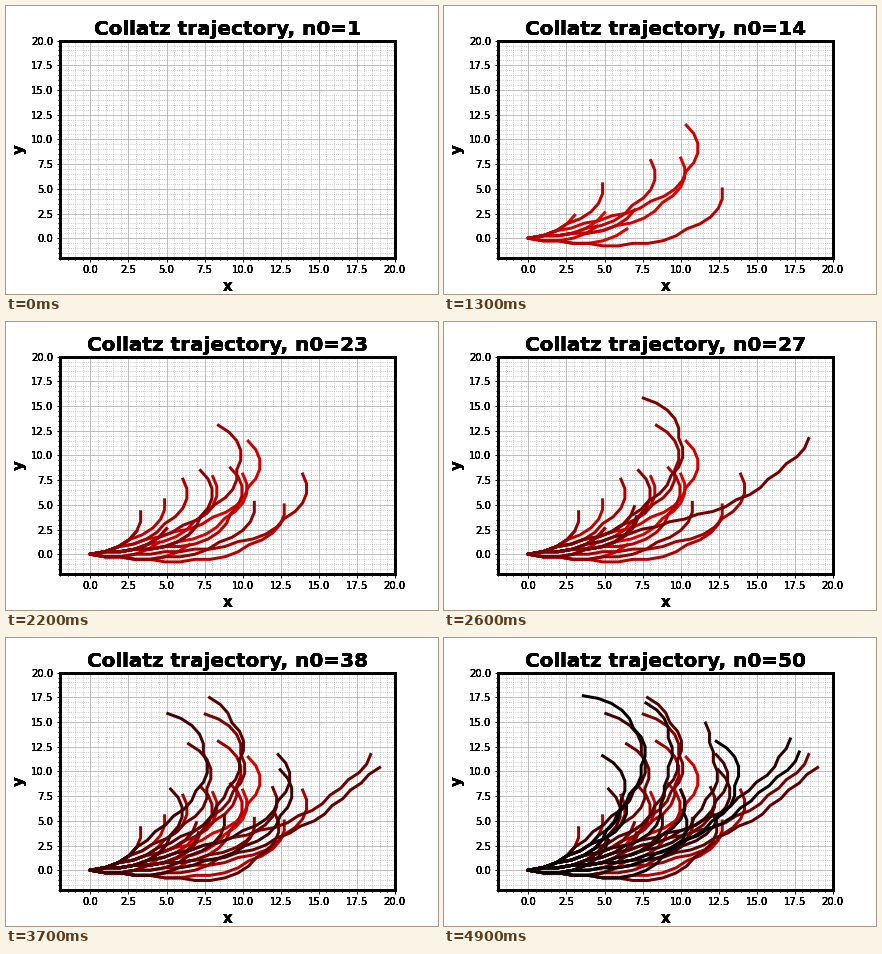
A matplotlib script that plays this animation: 432x288 px, repeating every 5000 ms.

```python
import numpy as np
import matplotlib.pyplot as plt
from matplotlib.animation import FuncAnimation

COUNT = 50
MAX_TERMS = 25
TURN = np.radians(15)

plt.rcParams["font.family"] = "DejaVu Sans"


def collatz(n):
    terms = [n]
    while n != 1 and len(terms) < MAX_TERMS:
        n = 3 * n + 1 if n % 2 else n // 2
        terms.append(n)
    return terms


def trajectory(n):
    """Unit steps that turn left on even terms and right on odd ones."""
    turns = [-TURN if term % 2 else TURN for term in collatz(n)[1:-1]]
    heading = np.cumsum(turns)
    x = np.concatenate([[0], np.cumsum(np.cos(heading))])
    y = np.concatenate([[0], np.cumsum(np.sin(heading))])
    return x, y


def harden(artist, passes=5):
    """Paint an artist repeatedly so that its soft edges turn solid."""
    draw = artist.draw

    def draw_repeatedly(renderer):
        for _ in range(passes):
            draw(renderer)

    artist.draw = draw_repeatedly


fig, ax = plt.subplots(figsize=(6, 4), dpi=72, facecolor="white")
fig.subplots_adjust(left=0.125, right=0.9, bottom=0.125, top=0.88)
ax.set(xlim=(-2, 20), ylim=(-2, 20))
ax.set_xticks(np.arange(0, 20.1, 2.5))
ax.set_yticks(np.arange(0, 20.1, 2.5))
ax.minorticks_on()
ax.tick_params(which="both", width=1)
ax.tick_params(labelsize=10)
ax.grid(which="major", color="#b0b0b0", linestyle="-", linewidth=0.8)
ax.grid(which="minor", color="#b0b0b0", linestyle=":", linewidth=0.8)
for spine in ax.spines.values():
    spine.set_linewidth(3)

title = ax.set_title("", fontsize=20, fontweight="bold")
x_label = ax.set_xlabel("x", fontsize=15, fontweight="bold")
y_label = ax.set_ylabel("y", fontsize=15, fontweight="bold")
for text in [title, x_label, y_label, *ax.get_xticklabels(), *ax.get_yticklabels()]:
    harden(text)

curves = []
for n in range(1, COUNT + 1):
    x, y = trajectory(n)
    if len(x) < 2:
        x, y = [], []
    curves += ax.plot(x, y, color=(1 - n / COUNT, 0, 0), linewidth=3)


def update(frame):
    for i, curve in enumerate(curves):
        curve.set_visible(i <= frame)
    title.set_text(f"Collatz trajectory, n0={frame + 1}")
    return curves


animation = FuncAnimation(fig, update, frames=COUNT, interval=100,
                          repeat=True, repeat_delay=0, blit=False)
plt.show()
```
